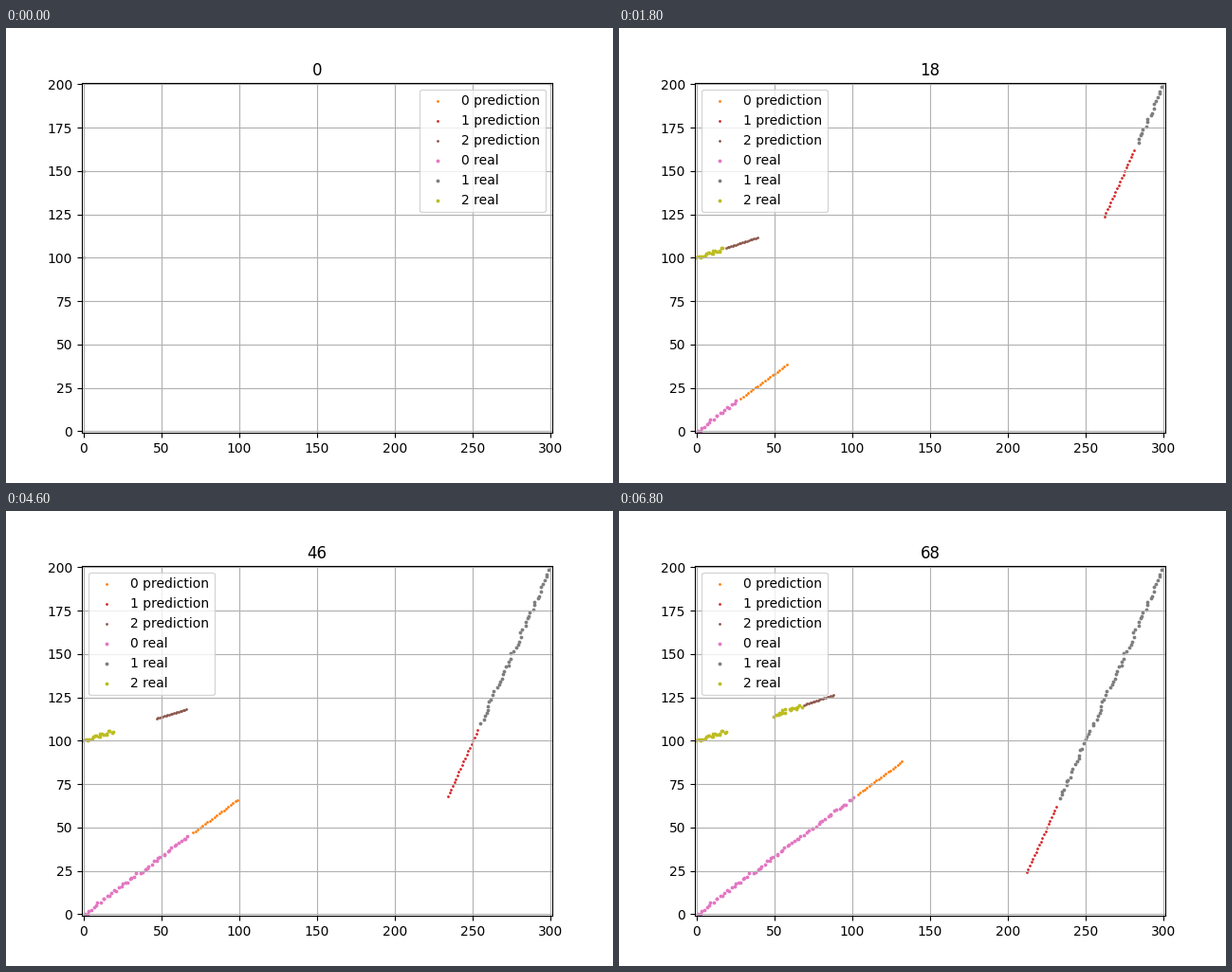
Write a matplotlib script that moves like this. It is 640 px wide and 480 px high and loops after 6.9 s.

```python
import numpy as np
import matplotlib.pyplot as plt
from matplotlib.animation import FuncAnimation

FRAMES, STEP_MS, AHEAD = 69, 100, 20
HIDDEN = slice(20, 50)  # track 2 is not measured in this span

START = np.array([(0, 0), (300, 200), (0, 100)], float)
VEL = np.array([(1.5, 1), (-1, -2), (1, 0.3)])
KICK = np.array([(0.4, 0.1), (-0.1, -0.05), (0.35, 0.08)])  # early velocity error
GUESS = np.array([(300, 200), (0, 150), (0, 100)], float)  # first filter states
DRIFT = 0.27  # slope of track 2 while it is extrapolated

rng = np.random.default_rng(4)


def path(k, t):
    return START[k] + np.outer(t, VEL[k])


def measure(k):
    pts = path(k, np.arange(FRAMES))
    pts += rng.uniform(-0.9, 0.9, pts.shape)
    if k == 2:
        pts[HIDDEN] = np.nan
    return pts


def predict(k, n):
    if n == 0:
        return GUESS[k:k + 1]
    steps = np.arange(AHEAD)
    t = n + 1 + steps
    pts = path(k, t) + np.outer(steps, KICK[k] * np.exp(-n / 9))
    if k == 2 and HIDDEN.start <= n <= HIDDEN.stop:
        pts[:, 1] = 105.4 + DRIFT * (t - HIDDEN.start + 1)
    return pts


def seen(k, n):
    pts = REAL[k][:n]
    return pts[~np.isnan(pts[:, 0])]


REAL = [measure(k) for k in range(3)]

fig, ax = plt.subplots(figsize=(6.4, 4.8), dpi=100)
ax.set(xlim=(-1, 301), ylim=(-1, 201))
ax.grid(True)
title = ax.text(0.5, 1.02, "0", size="large", ha="center",
                transform=ax.transAxes)


def dots(label, color, size):
    return ax.scatter([], [], s=size, color=color, label=label)


preds = [dots(f"{k} prediction", c, 1)
         for k, c in enumerate(("tab:orange", "tab:red", "tab:brown"))]
reals = [dots(f"{k} real", c, 3)
         for k, c in enumerate(("tab:pink", "tab:gray", "tab:olive"))]
legend = ax.legend(loc="upper right")


def update(n):
    title.set_text(str(n))
    legend.set_loc("upper left" if n else "upper right")
    for k in range(3):
        preds[k].set_offsets(predict(k, n))
        reals[k].set_offsets(seen(k, n))
    return [title, legend, *preds, *reals]


anim = FuncAnimation(fig, update, frames=FRAMES, interval=STEP_MS,
                     repeat=True, repeat_delay=0, blit=False)
plt.show()
```
